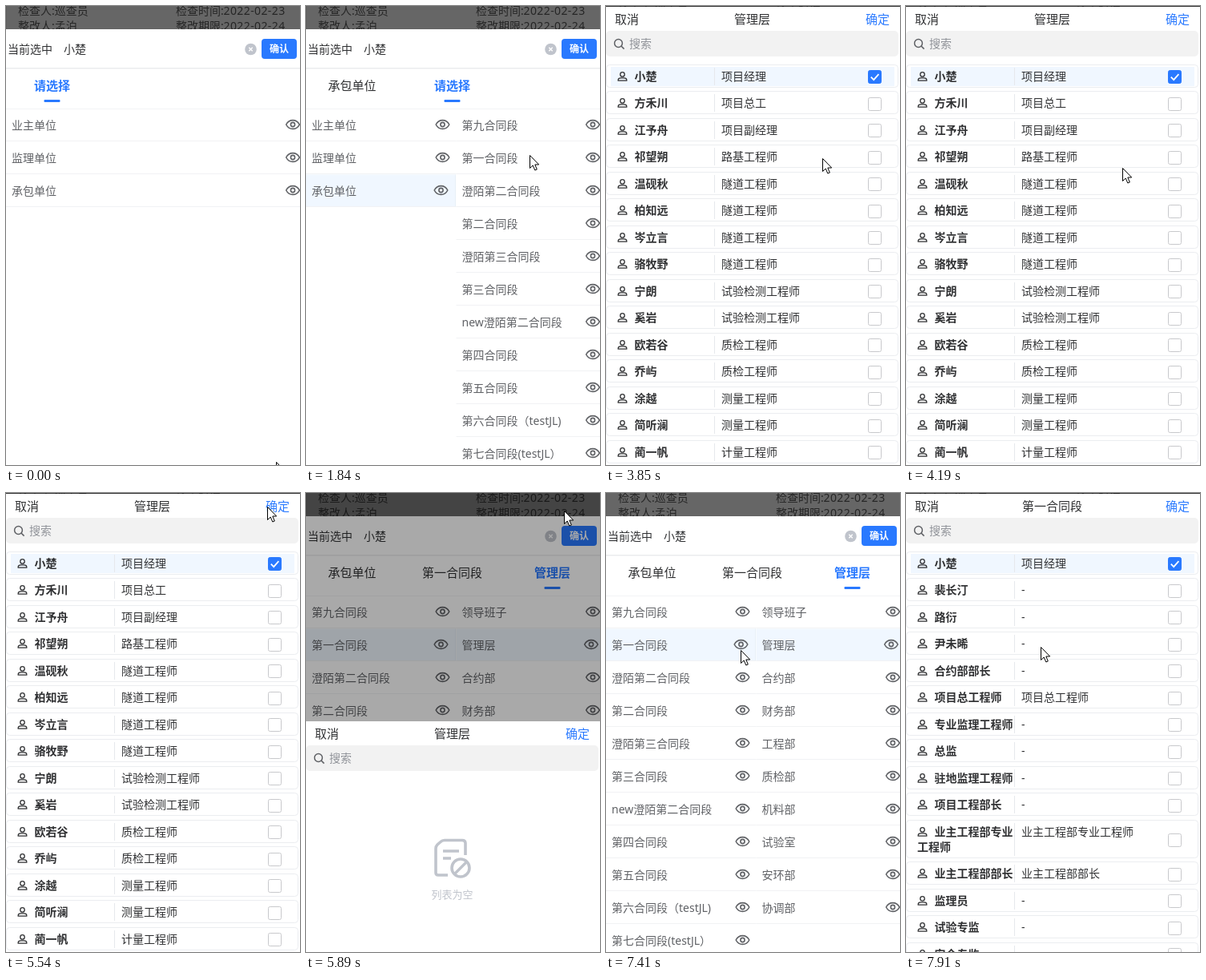
An HTML page for the animation above (8000 ms loop, 367 px wide and 573 px high).

```html
<!DOCTYPE html>
<html lang="zh-CN">
<head>
<meta charset="utf-8">
<title>人员选择</title>
<style>
html, body { margin: 0; width: 100%; height: 100%; overflow: hidden; background: #fff; }
svg { display: block; width: 367px; height: 573px; }
text { font-family: "Noto Sans", "Noto Sans CJK SC", "Noto Sans CJK", sans-serif; white-space: pre; }
</style>
</head>
<body>
<svg id="stage" viewBox="0 0 367 573"></svg>
<script>
const BLUE = '#2979ff', DARK = '#303133', GREY = '#606266', PALE = '#c0c4cc', TINT = '#f0f7ff';
const COL = 187.5, LOOP = 8000, POPUP_H = 572;
const stage = document.getElementById('stage');

function el(parent, tag, attrs = {}) {
  const node = document.createElementNS('http://www.w3.org/2000/svg', tag);
  set(node, attrs);
  parent.appendChild(node);
  return node;
}
function set(node, attrs) {
  for (const k in attrs) node.setAttribute(k, attrs[k]);
}
const group = (parent, x = 0, y = 0) => el(parent, 'g', { transform: `translate(${x} ${y})` });
const move = (node, x, y) => node.setAttribute('transform', `translate(${x} ${y})`);
const show = (node, on) => node.setAttribute('display', on ? 'inline' : 'none');
const rect = (parent, x, y, width, height, fill, more) =>
  el(parent, 'rect', { x, y, width, height, fill, ...more });
const stroke = (parent, d, color, width, more) =>
  el(parent, 'path', { d, fill: 'none', stroke: color, 'stroke-width': width, ...more });

// cy is the middle of the Chinese glyph box
function label(parent, str, x, cy, size, fill, more) {
  const node = el(parent, 'text', { x, y: cy + size * 0.38, 'font-size': size, fill, ...more });
  node.textContent = str;
  return node;
}
const MID = { 'text-anchor': 'middle' };

function eye(parent, x, y) {
  const g = group(parent, x, y);
  stroke(g, 'M-8.3 0C-4.6 -7.2 4.6 -7.2 8.3 0C4.6 7.2 -4.6 7.2 -8.3 0Z', GREY, 1.6);
  el(g, 'circle', { r: 2.6, fill: 'none', stroke: GREY, 'stroke-width': 1.6 });
  return g;
}

// --- Page behind the picker ---
rect(stage, 0, 0, 367, 573, '#fff');
rect(stage, 0, 0, 367, 29, '#666');
rect(stage, 0, 0, 1, 29, '#5c5c5c');
[['检查人:巡查员', '检查时间:', '2022-02-23', 6], ['整改人:孟泊', '整改期限:', '2022-02-24', 25]]
  .forEach(([who, what, date, y]) => {
    label(stage, who, 15, y, 14, '#262626');
    label(stage, what, 212, y, 14, '#262626');
    label(stage, date, 271.5, y, 14, '#262626', { 'letter-spacing': 0.4 });
  });

// --- Columns of the picker ---
const sections = ['第九合同段', '第一合同段', '澄陌第二合同段', '第二合同段', '澄陌第三合同段', '第三合同段',
  'new澄陌第二合同段', '第四合同段', '第五合同段', '第六合同段（testJL)', '第七合同段(testJL）'];
const teams = ['领导班子', '管理层', '合约部', '财务部', '工程部', '质检部', '机料部', '试验室', '安环部', '协调部'];

function column(names, picked) {
  const g = group(stage);
  rect(g, 0, 79, 375, 494, '#fff');
  const mark = group(g);
  rect(mark, 0, 128.5 + picked * 41, COL - 1, 40, TINT);
  rect(mark, COL - 1.5, 128.5 + picked * 41, 1, 40, '#e8f0f8');
  const eyes = names.map((name, i) => {
    label(g, name, 7, 149 + i * 41, 14, GREY);
    rect(g, 0, 168 + i * 41, 375, 1, '#f1f2f4');
    return eye(g, 170.5, 148 + i * 41);
  });
  return { g, mark, eyes, picked };
}
function updateColumn(col, x, picked, wide) {
  move(col.g, x, 0);
  show(col.mark, picked);
  col.eyes.forEach((e, i) => {
    const shift = picked && i === col.picked ? -2 : 0;
    move(e, (wide ? 358 : 170.5) + shift, 148 + i * 41);
  });
}
const cols = [
  column(['业主单位', '监理单位', '承包单位'], 2),
  column(sections, 1),
  column(teams, 1)
];

// --- Header and tabs ---
rect(stage, 0, 29, 367, 99, '#fff');
label(stage, '当前选中', 2, 54, 14, DARK);
label(stage, '小楚', 72, 54, 14, DARK);
el(stage, 'circle', { cx: 305.5, cy: 54, r: 7.3, fill: PALE });
stroke(stage, 'M303.3 51.8l4.4 4.4m0 -4.4l-4.4 4.4', '#fff', 1.4);
rect(stage, 319, 41, 44, 25, BLUE, { rx: 4 });
label(stage, '确认', 341, 53.5, 12, '#fff', { ...MID, 'font-weight': 700 });
rect(stage, 0, 77, 367, 1.5, '#ebecee');
rect(stage, 0, 128, 367, 1, '#f3f4f6');
const tabs = [0, 1, 2].map(i => label(stage, '', 57.5 + i * 125, 99.5, 15, DARK, MID));
const underline = rect(stage, 0, 117, 20, 3, BLUE, { rx: 1 });

// --- Popup ---
const shade = rect(stage, 0, 0, 367, 573, '#000');
const popup = group(stage);
rect(popup, 0, 1, 367, POPUP_H, '#fff');
label(popup, '取消', 11, 16.3, 15, DARK);
const title = label(popup, '', 182.5, 16.3, 15, DARK, MID);
label(popup, '确定', 324, 16.3, 15, BLUE);
rect(popup, 0, 31, 365, 32, '#f2f2f2', { rx: 5 });
el(popup, 'circle', { cx: 15.5, cy: 46.5, r: 4.9, fill: 'none', stroke: GREY, 'stroke-width': 1.5 });
stroke(popup, 'M19 50l3.6 3.6', GREY, 1.6);
label(popup, '搜索', 29, 47, 14, '#909399');

function person(parent, x, y) {
  const g = group(parent, x, y);
  el(g, 'circle', { cy: -2.6, r: 2.7, fill: 'none', stroke: DARK, 'stroke-width': 1.3 });
  stroke(g, 'M-5.3 5.2V4.2C-5.3 2.4 -3.7 1.8 -2 1.8H2C3.7 1.8 5.3 2.4 5.3 4.2V5.2Z', DARK, 1.3);
}
function checkbox(parent, y, on) {
  rect(parent, 327.5, y - 8, 16, 16, on ? BLUE : '#fff', { rx: 2, stroke: on ? BLUE : '#c8c9cc' });
  if (on) stroke(parent, `M330.8 ${y + 0.2}l3.4 3.4l6.2 -7`, '#fff', 1.8);
}
function people(rows) {
  const g = group(popup);
  let top = 74;
  rows.forEach(([name, job], i) => {
    const lines = name.split('|');
    const h = lines.length > 1 ? 47 : 28, y = Math.floor(top);
    rect(g, 0.5, y - 0.5, 364, h, '#fff', { rx: 4, stroke: '#ebedf0' });
    if (!i) rect(g, 6, y + 2, 354, 24, TINT);
    rect(g, 135, y + 3, 1, h - 6, '#e6e8ec');
    person(g, 20.5, y + 14);
    lines.forEach((s, n) => label(g, s, n ? 14 : 35.5, y + 14 + n * 18.5, 14, DARK, { 'font-weight': 700 }));
    label(g, job, 144, y + 14, 14, DARK);
    checkbox(g, Math.round(top + h / 2) + 0.5, !i);
    top += h + 5.5;
  });
  return g;
}
const first = ['小楚', '项目经理'];
const tunnel = '隧道工程师', test = '试验检测工程师', quality = '质检工程师', survey = '测量工程师';
const teamList = people([
  first, ['方禾川', '项目总工'], ['江予舟', '项目副经理'], ['祁望朔', '路基工程师'],
  ['温砚秋', tunnel], ['柏知远', tunnel], ['岑立言', tunnel], ['骆牧野', tunnel],
  ['宁朗', test], ['奚岩', test], ['欧若谷', quality], ['乔屿', quality],
  ['涂越', survey], ['简听澜', survey], ['蔺一帆', '计量工程师']
]);
const sectionList = people([
  first, ['裴长汀', '-'], ['路衍', '-'], ['尹未晞', '-'], ['合约部部长', '-'],
  ['项目总工程师', '项目总工程师'], ['专业监理工程师', '-'], ['总监', '-'],
  ['驻地监理工程师', '-'], ['项目工程部长', '-'], ['业主工程部专业|工程师', '业主工程部专业工程师'],
  ['业主工程部部长', '业主工程部部长'], ['监理员', '-'], ['试验专监', '-'], ['安全专监', '-']
]);

const emptyList = group(popup, 160, 147);
stroke(emptyList, 'M39 21V6Q39 2.5 35 2.5H13Q10 2.5 8 4.5L4 8Q2 10 2 13V43Q2 46 5 46H17', PALE, 3.6);
stroke(emptyList, 'M11 16H31M11 25H21', PALE, 3.6);
el(emptyList, 'circle', { cx: 33, cy: 37, r: 11, fill: '#fff', stroke: PALE, 'stroke-width': 3.6 });
stroke(emptyList, 'M25.5 44.5L40.5 29.5', PALE, 3.4);
label(emptyList, '列表为空', 22.5, 70, 13, PALE, MID);

// --- Pointer ---
const pointer = group(stage);
el(pointer, 'path', {
  d: 'M.5 .5V16.5L4.2 13L6.8 19L9.3 18L6.8 12H11.7Z',
  fill: '#fff', stroke: '#000', 'stroke-width': 1
});
const path = [
  [0, 337, 569], [160, 250, 400], [330, 148, 226], [990, 148, 226], [1840, 279, 186],
  [2010, 279, 192], [2180, 279, 177], [2680, 279, 177], [3010, 275, 164], [3350, 270, 190],
  [3850, 270, 190], [4190, 270, 202], [4700, 60, 42], [4870, 24, 8], [5210, 308, 20],
  [5380, 308, 20], [5540, 326, 17], [5710, 326, 17], [5890, 322, 22], [6060, 316, 32],
  [6560, 186, 199], [6900, 63, 188], [7070, 100, 186], [7410, 168, 196], [7740, 168, 196],
  [7910, 168, 192], [LOOP, 168, 192]
];
function pointerAt(t) {
  const i = path.findIndex(p => p[0] > t);
  const [t0, x0, y0] = path[i - 1], [t1, x1, y1] = path[i];
  const k = (t - t0) / (t1 - t0);
  return [Math.round(x0 + (x1 - x0) * k), Math.round(y0 + (y1 - y0) * k)];
}

// The screen refreshes in ticks: [end of stretch, even ticks within it]
const stretches = [
  [160, 1], [330, 1], [820, 3], [1840, 6], [2180, 2], [2510, 2], [3010, 3], [3190, 1], [3520, 2],
  [3680, 1], [4700, 6], [5210, 3], [5540, 2], [5890, 2], [6060, 1], [6560, 3], [7410, 5],
  [7740, 2], [7910, 1], [LOOP, 1]
];
function tickStart(t) {
  const i = stretches.findIndex(([end]) => end > t);
  const from = i ? stretches[i - 1][0] : 0;
  const [end, count] = stretches[i];
  const tick = (end - from) / count;
  return from + Math.floor((t - from) / tick) * tick;
}
const slide = (t, start) => Math.min(1, Math.max(0, (t - start) / 300));

function draw(time) {
  const t = tickStart(time);
  const a = slide(t, 680), b = slide(t, 2370);
  const chosen = t >= 3350;

  updateColumn(cols[0], -COL * b, a > 0, a === 0);
  updateColumn(cols[1], COL * (2 - a - b), b > 0);
  updateColumn(cols[2], COL * (2 - b) + (b ? 0 : COL), chosen);

  const active = (a > 0) + (b > 0);
  const names = ['承包单位', '第一合同段', '管理层'];
  tabs.forEach((tab, i) => {
    const on = i === active;
    tab.textContent = i < active || (on && chosen) ? names[i] : on ? '请选择' : '';
    set(tab, { fill: on ? BLUE : DARK, 'font-weight': on ? 700 : 400 });
  });
  set(underline, { x: 47.5 + 125 * (a + b) });

  const second = t >= 7600;
  const closed = slide(t, 3540) - slide(t, 5741) + slide(t, 7600);
  const away = 1 - closed;
  show(popup, closed > 0);
  move(popup, 0, Math.round(POPUP_H * away));
  set(shade, { opacity: 0.5 * (1 - Math.pow(away, 1.6)) });
  title.textContent = second ? '第一合同段' : '管理层';
  show(teamList, t < 5710);
  show(emptyList, t >= 5710 && !second);
  show(sectionList, second);

  move(pointer, ...pointerAt(t));
}

function loop() {
  draw(performance.now() % LOOP);
  requestAnimationFrame(loop);
}
loop();
</script>
</body>
</html>
```
